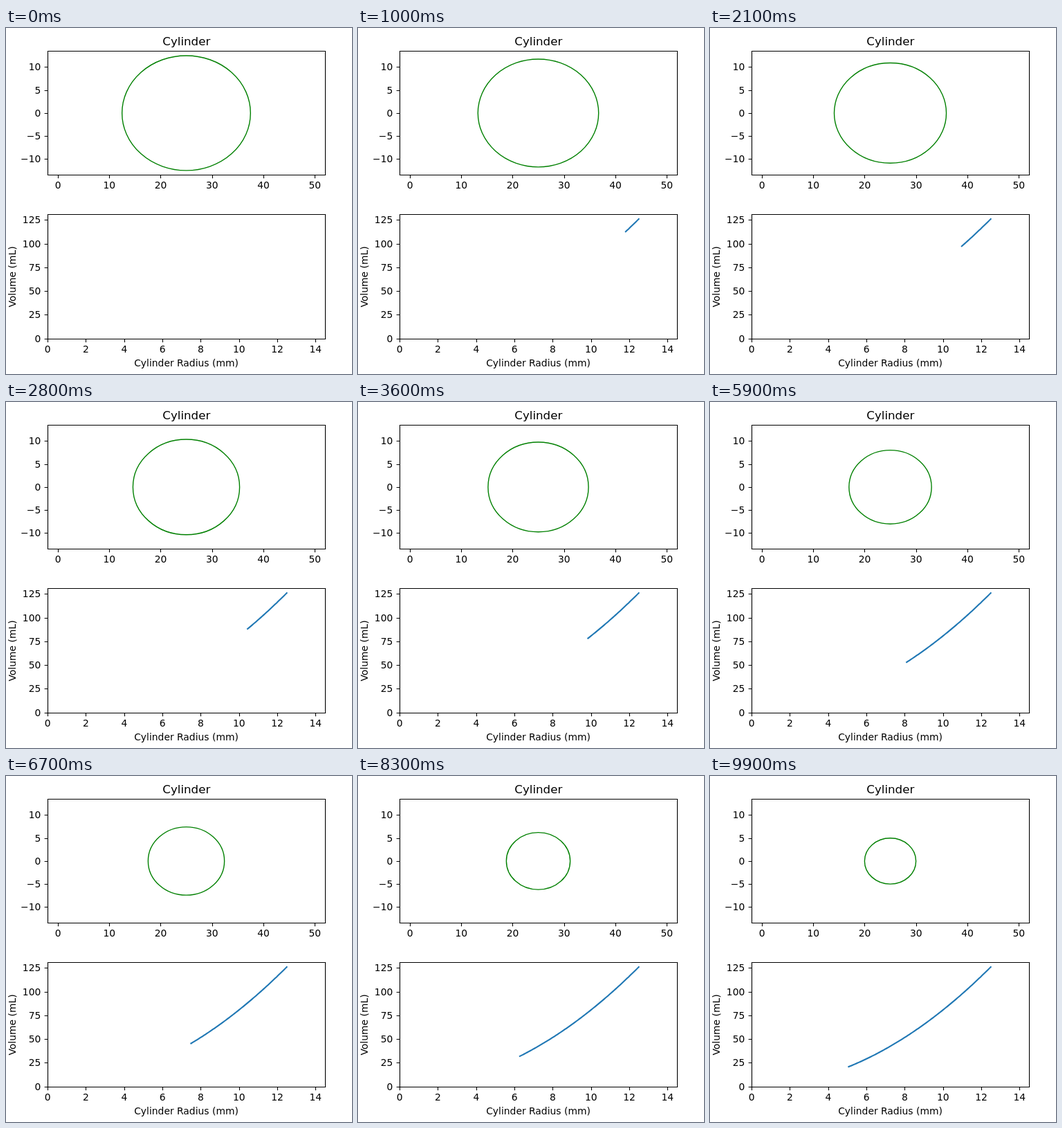
Recreate the animation shown at these times as an HTML page. Size 500x500 px, loop 10 s.

```html
<!DOCTYPE html>
<html lang="en">
<head>
<meta charset="utf-8">
<title>Cylinder</title>
<style>
  html, body { margin: 0; width: 100%; height: 100%; overflow: hidden; background: #fff; }
  svg { display: block; width: 500px; height: 500px; }
  text { font: 13.89px "DejaVu Sans", sans-serif; text-anchor: middle; }
  .title { font-size: 16.67px; }
  .y { text-anchor: end; }
  .axes { fill: none; stroke: #000; stroke-width: 1.11; }
  #circle { fill: none; stroke: #008000; stroke-width: 1.39; }
  #curve { fill: none; stroke: #1f77b4; stroke-width: 2.08; stroke-linecap: square; stroke-linejoin: round; }
</style>
</head>
<body>
<svg viewBox="0 0 500 500">
  <ellipse id="circle" cx="260.5" cy="122.9"/>
  <polyline id="curve"/>
  <g id="plots"></g>
  <text class="title" x="260.8" y="25">Cylinder</text>
  <text x="260.5" y="489">Cylinder Radius (mm)</text>
  <text transform="translate(14.3 359.5) rotate(-90)">Volume (mL)</text>
</svg>
<script>
const STEPS = 100, STEP_MS = 100;
const R_START = 12.5, R_END = 5;
const VOLUME_PER_R2 = 0.8064;

const LEFT = 60, RIGHT = 461, TICK = 4.86;
const circle = document.getElementById('circle');
const curve = document.getElementById('curve');
const plots = document.getElementById('plots');

const scale = (d0, d1, p0, p1) => v => p0 + (v - d0) / (d1 - d0) * (p1 - p0);
const snap = v => Math.round(v) + 0.5;

const shapePlot = { x: scale(-2, 52, LEFT, RIGHT), y: scale(-13.5, 13.5, 212.4, 33.2) };
const volumePlot = { x: scale(0, 14.5, LEFT, RIGHT), y: scale(0, 131, 448.6, 269.2) };

function add(tag, attrs, text = '') {
  const el = document.createElementNS('http://www.w3.org/2000/svg', tag);
  for (const key in attrs) el.setAttribute(key, attrs[key]);
  el.textContent = text;
  plots.append(el);
}

function drawAxes(plot, y0, y1, xTicks, yTicks) {
  const bottom = y1 + 0.5, left = LEFT + 0.5;
  let path = `M${left} ${y0 + 0.5}H${RIGHT + 0.5}V${bottom}H${left}Z`;
  for (const v of xTicks) {
    const x = plot.x(v);
    path += `M${snap(x)} ${bottom}v${TICK}`;
    add('text', { x: x + 0.2, y: Math.round(y1 + 20.4), class: 'x' }, v);
  }
  for (const v of yTicks) {
    const y = plot.y(v);
    path += `M${left} ${snap(y)}h${-TICK}`;
    add('text', { x: 50.3, y: Math.round(y + 5), class: 'y' }, String(v).replace('-', '\u2212'));
  }
  add('path', { d: path, class: 'axes' });
}

drawAxes(shapePlot, 33, 212, [0, 10, 20, 30, 40, 50], [-10, -5, 0, 5, 10]);
drawAxes(volumePlot, 269, 449, [0, 2, 4, 6, 8, 10, 12, 14], [0, 25, 50, 75, 100, 125]);

const radius = i => R_START + (R_END - R_START) * i / (STEPS - 1);

function draw(step) {
  const r = radius(step);
  circle.setAttribute('rx', shapePlot.x(r) - shapePlot.x(0));
  circle.setAttribute('ry', shapePlot.y(0) - shapePlot.y(r));

  // The curve trails the circle by one step and needs two points to show.
  const points = [];
  for (let i = 0; i < step && step > 1; i++) {
    const ri = radius(i);
    const x = volumePlot.x(ri), y = volumePlot.y(VOLUME_PER_R2 * ri * ri);
    points.push(x.toFixed(2) + ',' + y.toFixed(2));
  }
  curve.setAttribute('points', points.join(' '));
}

const start = performance.now();
function tick() {
  const elapsed = Math.max(0, performance.now() - start);
  draw(Math.floor(elapsed / STEP_MS) % STEPS);
  requestAnimationFrame(tick);
}
tick();
</script>
</body>
</html>
```
